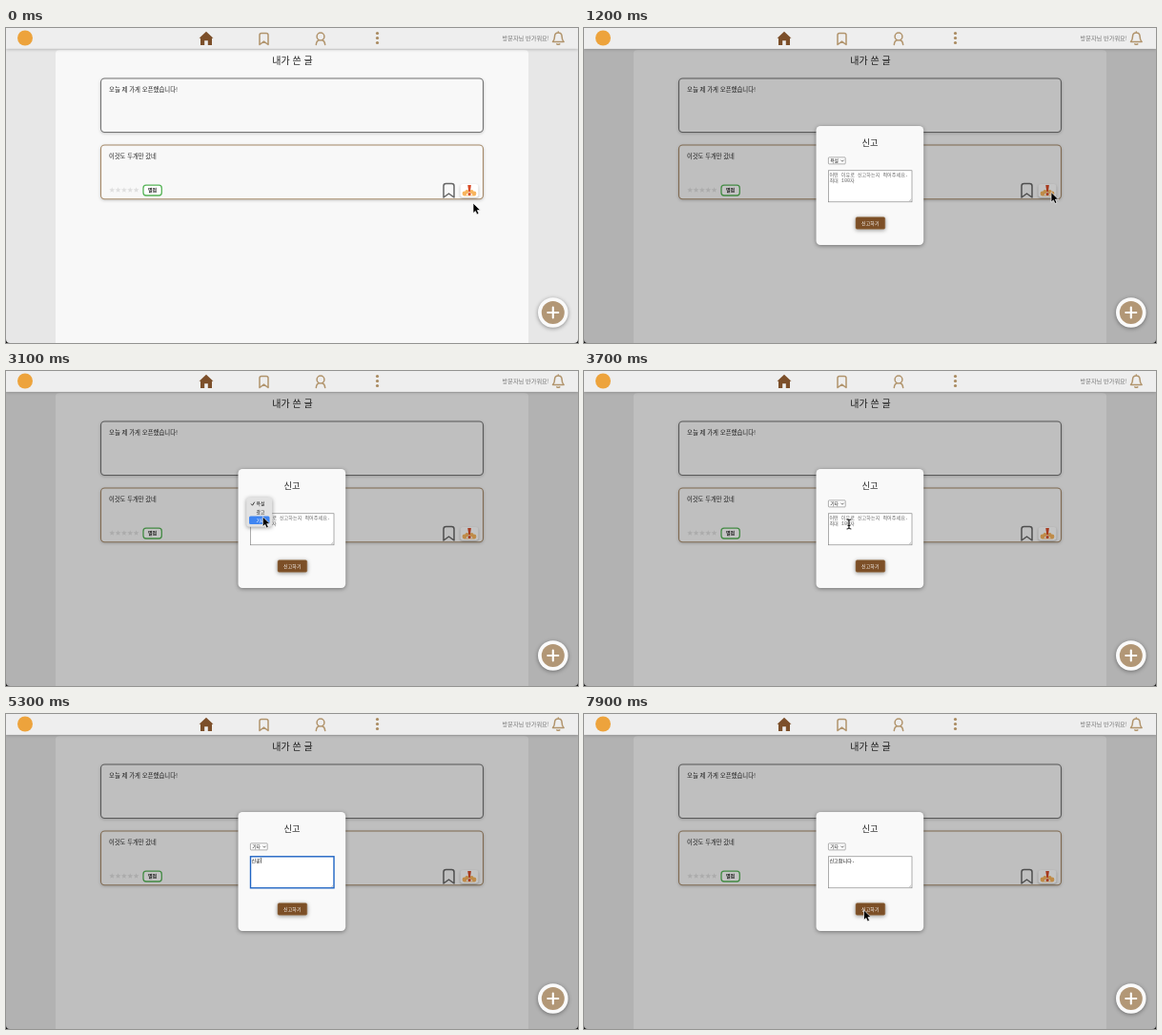
Recreate the animation shown at these times as an HTML page. Size 600 by 331 pixels, loop 8 s.

```html
<!DOCTYPE html>
<html lang="ko">
<head>
<meta charset="utf-8">
<style>
  html, body { margin: 0; width: 100%; height: 100%; overflow: hidden; background: #111; }
  svg { display: block; width: 100%; height: 100%; border-radius: 0 0 4px 4px; background: #e7e7e7; }
  text { font-family: "Noto Sans CJK KR", "Noto Sans CJK", sans-serif; fill: #222; }
  .mid { text-anchor: middle; }
  .bold { font-weight: 700; }
  .mono { font-family: "Liberation Mono", "Noto Sans CJK KR", monospace; font-size: 5.1px; }
  .line { fill: none; stroke-linejoin: round; stroke-linecap: round; }
  .soft { filter: drop-shadow(0 1px 1.5px #0003); }
  .lift { filter: drop-shadow(0 1px 2px #0006); }
</style>
</head>
<body>
<svg viewBox="0 0 600 331">
  <rect x="52" y="23" width="496" height="320" rx="4" fill="#f8f8f8"/>
  <text class="mid" x="300.5" y="38" font-size="10">내가 쓴 글</text>

  <g class="soft" fill="#f8f8f8" stroke-width="1.1">
    <rect x="99.5" y="53" width="401" height="56.5" rx="4" stroke="#747474"/>
    <rect x="99.5" y="123" width="401" height="56.7" rx="4" stroke="#a68a69"/>
  </g>
  <text x="108" y="66.6" font-size="6.4">오늘 제 가게 오픈했습니다!</text>
  <text x="108" y="136.6" font-size="6.3">이것도 두개만 갔네</text>
  <g id="stars" fill="#dedede"></g>
  <rect x="144" y="165.2" width="19.3" height="10.8" rx="3" fill="#fff" stroke="#55b356" stroke-width="1.3"/>
  <text class="mid bold" x="153.6" y="172.4" font-size="5">별점</text>
  <path class="line" d="M459 178V166q0-2.5 2.5-2.5h6q2.500 2.500 2.500V178l-5.500-4z" stroke="#666" stroke-width="1.5" id="cardMark"/>

  <g id="report">
    <rect id="reportBox" x="476.5" y="164" width="19" height="14" rx="3" fill="#fff"/>
    <g id="puffs" fill="#f8b45c">
      <circle cx="481" cy="174" r="2.400"/><circle cx="483.500" cy="172" r="2"/>
      <circle cx="491" cy="174" r="2.400"/><circle cx="488.500" cy="172" r="2"/>
      <path d="M479 176.800q7-3 14 0z" fill="#fbd3a0"/>
    </g>
    <path d="M484.300 165h3.600l-1 7.300h-1.600z" fill="#d84a26"/>
    <circle cx="486.100" cy="174.600" r="1.500" fill="#d84a26"/>
  </g>

  <rect id="shade" y="22" width="600" height="309" fill="#000" opacity=".23"/>

  <rect class="soft" width="600" height="21.800" fill="#eee"/>
  <circle cx="20" cy="10.500" r="8" fill="#eda33c"/>
  <path d="M202.500 10.800L210 3.800l7.500 7h-1.500V18h-4.200v-4.800h-3.600V18H204v-7.200z" fill="#7c4f2a"/>
  <g class="line" stroke="#b1946c" stroke-width="1.500">
    <path d="M266 17.500V7.500q0-2 2-2h5q2 0 2 2v10l-4.500-3.400z"/>
    <circle cx="330" cy="9" r="3.900"/>
    <path d="M325.300 17.500q.4-4 3-4.800M334.700 17.500q-.4-4-3-4.800"/>
    <path d="M573.500 14.500q2-2 2-5.500q0-4 3.800-4t3.800 4q0 3.500 2 5.500zM577.800 16.800q1.500 1 3 0M579.300 4.800v-.8"/>
  </g>
  <g fill="#a98a60"><circle cx="389.500" cy="5.500" r="1.600"/><circle cx="389.500" cy="10.500" r="1.600"/><circle cx="389.500" cy="15.500" r="1.600"/></g>
  <text x="520.500" y="13.200" font-size="6.200" style="fill:#777">방문자님 반가워요!</text>

  <g class="lift"><circle cx="573.800" cy="299" r="15.800" fill="#fafafa"/></g>
  <circle cx="573.800" cy="299" r="12" fill="#b29776"/>
  <path class="line" d="M568.300 299h11M573.800 293.500v11" stroke="#fff" stroke-width="2.100"/>

  <g id="modal">
    <rect class="lift" x="243.500" y="103" width="112.700" height="125" rx="4.500" fill="#f9f9f9"/>
    <text class="mid" x="300" y="124" font-size="9.200">신고</text>
    <rect x="256.400" y="135.900" width="17.800" height="7" rx=".8" fill="#fff" stroke="#777" stroke-width=".6"/>
    <text id="choice" x="258.200" y="141.200" font-size="4.800" font-weight="500"></text>
    <path class="line" d="M269.600 138.900l1.400 1.400 1.400-1.400" stroke="#333" stroke-width=".7"/>
    <rect id="area" x="256.500" y="149.800" width="87.500" height="33" fill="#fff"/>
    <path d="M341 182l2.300-2.300M342.300 182l1-1" stroke="#888" stroke-width=".4"/>
    <g id="hint">
      <text class="mono" x="257.400" y="155.600" style="fill:#666">어떤 이유로 신고하는지 적어주세요.</text>
      <text class="mono" x="257.400" y="161.800" style="fill:#666">최대 100자</text>
    </g>
    <text id="typed" class="mono" x="257.400" y="155.600" style="fill:#111"></text>
    <rect id="caret" y="151" width=".6" height="5.800" fill="#111"/>
    <rect id="send" class="lift" x="285" y="198.700" width="30.800" height="12.600" rx="1.500" fill="#7c4f27" stroke="#9b744c" stroke-width=".5"/>
    <text class="mid" x="300.300" y="206.700" font-size="5" font-weight="500" style="fill:#fff">신고하기</text>
  </g>

  <g id="menu">
    <rect class="lift" x="252.200" y="132.800" width="27" height="31" rx="3.500" fill="#e2e2e2"/>
    <rect id="pick" x="255" width="21.500" height="8.600" rx="1.500" fill="#3f85f2"/>
    <path id="tick" class="line" d="M257.300 139.800l1.200 1.400 2-3.200" stroke-width=".8"/>
    <g id="options" font-size="4.800" font-weight="500"></g>
  </g>

  <circle id="ring" fill="none" stroke="#222" stroke-width="1.100"/>
  <g id="pointer">
    <path id="arrow" d="M0 0V10.600L2.400 8.400L4 12L6 11.100L4.400 7.600H7.700Z" fill="#000" stroke="#fff" stroke-width=".7"/>
    <path id="hand" d="M0 .8Q1-.4 2 .8L3.400 5Q4.500 4 5.200 5Q6.400 4.200 7 5.400Q8.300 5 8.700 6.500L9 9.500L8.300 12.300L3.500 13L-.8 8.600Q-1 7.200 .3 7.500L1.500 8.300Z" fill="#fff" stroke="#111" stroke-width=".9" stroke-linejoin="round"/>
    <path id="beam" class="line" d="M-2-5Q0-5 0-3.800Q0-5 2-5M0-4V4M-2 5Q0 5 0 3.800Q0 5 2 5M-1 1.500H1" stroke="#111" stroke-width="1"/>
  </g>
</svg>
<script>
const LOOP = 8000;
const $ = id => document.getElementById(id);
const set = (id, attrs) => { for (const k in attrs) $(id).setAttribute(k, attrs[k]); };
const show = (id, on) => { $(id).style.display = on ? '' : 'none'; };

const star = cx => 'M' + Array.from({length: 10}, (_, i) => {
  const r = i % 2 ? 1.3 : 3.1, a = i * Math.PI / 5;
  return `${cx + r * Math.sin(a)} ${170.3 - r * Math.cos(a)}`;
}).join('L') + 'Z';
$('stars').innerHTML = [0, 1, 2, 3, 4].map(i => `<path d="${star(111.2 + i * 6.35)}"/>`).join('');
set('cardMark', {d: 'M459 178V166q0-2.500 2.500-2.500h6q2.500 0 2.500 2.500V178l-5.500-4z'});

const choices = ['욕설', '광고', '기타'];
$('options').innerHTML = choices.map((c, i) => `<text x="262.500" y="${141.300 + i * 8.600}">${c}</text>`).join('');
const rows = [...$('options').children];

const keystrokes = ['ㅅ', '시', '신', '신ㄱ', '신고', '신곻', '신고하', '신고합',
  '신고합ㄴ', '신고합니', '신고합닏', '신고합니다', '신고합니다.'];
const typeStart = 4800, typeStep = 100;

// Pointer stops: time, x, y
const stops = [
  [0, 490, 184], [100, 490, 184], [600, 491, 180], [950, 491, 174.5], [1100, 491, 174.5],
  [1200, 490, 172.5], [1500, 490, 172.5], [2350, 264, 139], [2700, 264, 139],
  [3100, 269.300, 153], [3300, 268, 158], [3450, 268, 158], [4100, 298, 167],
  [6200, 298, 167], [6500, 291.500, 202], [7450, 291.500, 202], [7900, 293.500, 206], [LOOP, 293.500, 206]
];
function pointerAt(t) {
  const i = stops.findIndex(s => s[0] > t);
  const [t0, x0, y0] = stops[i - 1], [t1, x1, y1] = stops[i];
  const p = (t - t0) / (t1 - t0), e = p * p * (3 - 2 * p);
  return [x0 + (x1 - x0) * e, y0 + (y1 - y0) * e];
}

const clicks = [1000, 2450, 3300, 4300, 6900];

function draw(t) {
  const [x, y] = pointerAt(t);
  const open = t >= 1200, menu = t >= 2500 && t < 3450, focused = t >= 4300 && t < 6900;
  const pressed = t >= 1000 && t < 1200;

  ['shade', 'modal'].forEach(id => show(id, open));
  set('reportBox', {stroke: pressed ? '#bbb' : 'none', style: `filter:drop-shadow(0 ${pressed ? 0 : 1}px 1px #0004)`});
  set('puffs', {opacity: pressed ? .8 : 1});

  $('choice').textContent = choices[t < 3400 ? 0 : 2];
  show('menu', menu);
  const row = Math.max(0, Math.min(2, Math.floor((y - 135.500) / 8.700)));
  set('pick', {y: 135.300 + row * 8.600});
  set('tick', {stroke: row ? '#111' : '#fff'});
  rows.forEach((r, i) => { r.style.fill = i === row ? '#fff' : '#111'; });

  const count = Math.min(keystrokes.length, Math.floor((t - typeStart) / typeStep) + 1);
  show('hint', count < 1);
  $('typed').textContent = count < 1 ? '' : keystrokes[count - 1];
  set('area', focused ? {stroke: '#1f64c4', 'stroke-width': 1.400} : {stroke: '#777', 'stroke-width': .6});
  show('caret', focused && count > 0 && t < 6650);
  set('caret', {x: 257.600 + $('typed').getComputedTextLength()});
  set('send', {fill: t >= 6900 && t < 7100 ? '#6b4220' : '#7c4f27'});

  const click = clicks.find(c => t >= c && t < c + 200);
  show('ring', click !== undefined);
  if (click !== undefined) set('ring', {cx: x - 1.500, cy: y - 2.700, r: Math.min(22.500, 13 + (t - click) * .095)});

  const hand = t >= 900 && t < 1200;
  const beam = open && !menu && x > 256 && x < 344 && y > 150 && y < 183;
  set('pointer', {transform: `translate(${x} ${y})`});
  show('pointer', t < typeStart || t >= 6200);
  show('hand', hand);
  show('beam', beam);
  show('arrow', !hand && !beam);
}

const start = performance.now();
function tick() {
  draw((performance.now() - start) % LOOP);
  requestAnimationFrame(tick);
}
draw(0);
requestAnimationFrame(tick);
</script>
</body>
</html>
```
